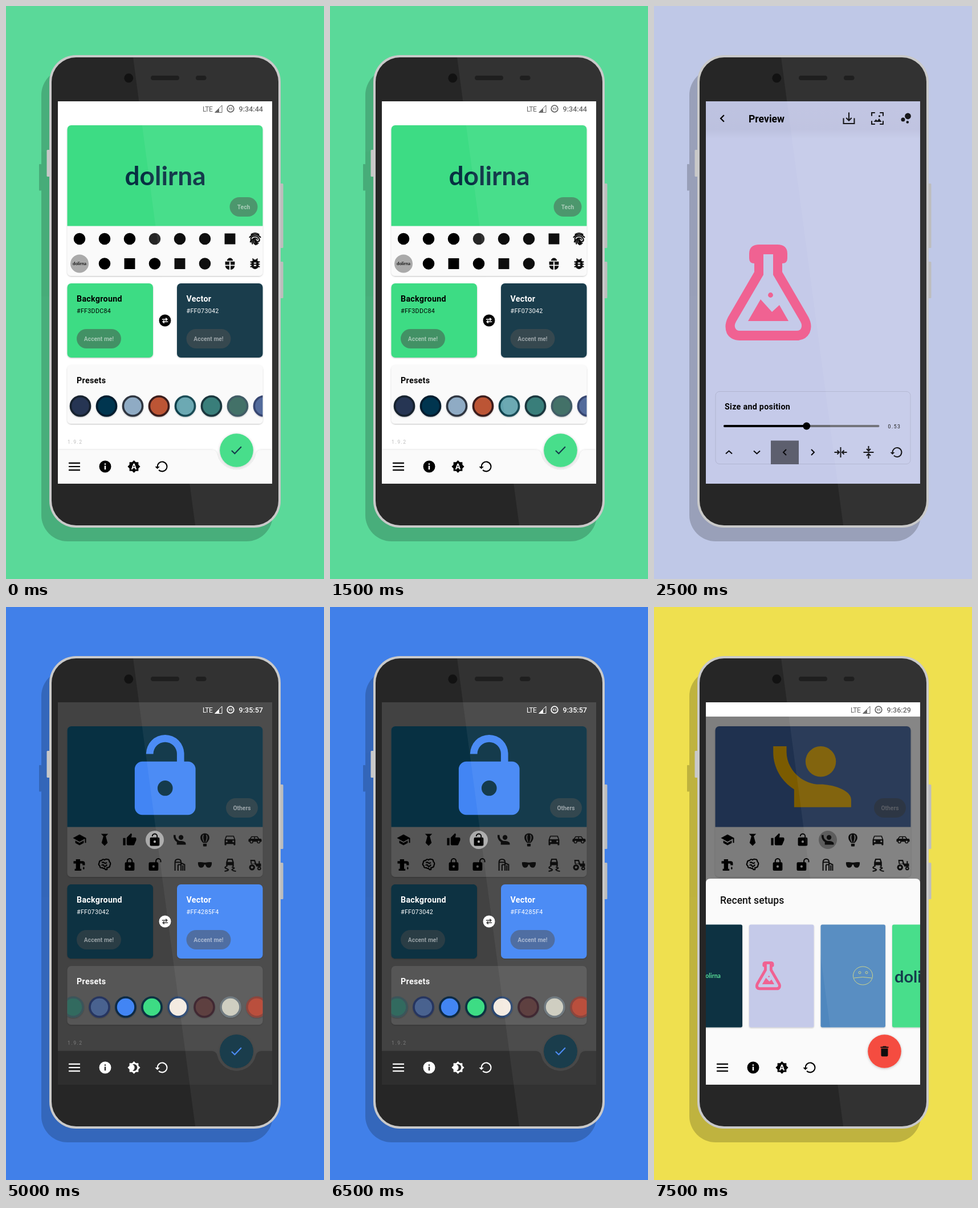
An HTML page that plays this animation: 558x1004 px, repeating every 10000 ms.

```html
<!DOCTYPE html>
<html lang="en">
<head>
<meta charset="utf-8">
<title>Wallpaper app tour</title>
<style>
html, body { margin: 0; width: 100%; height: 100%; overflow: hidden; }
svg { display: block; width: 100%; height: 100%; font-family: Roboto, sans-serif; }
.h { font-size: 14.3px; font-weight: 700; letter-spacing: .28px; }
.hex { font-size: 10.7px; letter-spacing: .3px; }
.chip { font-size: 10.3px; font-weight: 700; text-anchor: middle; }
.tiny { font-size: 8.7px; letter-spacing: 1.5px; }
.word { font-family: Lato, sans-serif; font-weight: 700; }
.line { fill: none; stroke-width: 2; }
</style>
</head>
<body>
<svg id="stage" viewBox="0 0 558 1004"></svg>
<script>
const SCENE_MS = 2500;
const WORD = 'dolirna';
const NAVY = '#073042', GREEN = '#3DDC84', BLUE = '#4285F4', LILAC = '#C5CAE9', PINK = '#F06292';

const SUN = 'M20 8.7V4h-4.7L12 .7 8.7 4H4v4.7L.7 12 4 15.3V20h4.7l3.3 3.3 3.3-3.3H20v-4.7l3.3-3.3z';

// Filled icons on a 24 unit grid
const FILL = {
  school: 'M5 13.2v4L12 21l7-3.8v-4L12 17zM12 3 1 9l11 6 9-4.9V17h2V9z',
  tie: 'M6 2l4 4-3 11 5 5 5-5-3-11 4-4z',
  thumb: 'M1 21h4V9H1zm22-11c0-1.1-.9-2-2-2h-6.300l1-4.900c0-.4-.2-.8-.5-1.100L14.200 1 7.600 7.600C7.200 8 7 8.500 7 9v10c0 1.100.9 2 2 2h9c.8 0 1.500-.5 1.800-1.200l3-7.100c.1-.2.2-.4.2-.7z',
  unlock: 'M12 17a2 2 0 1 0 0-4 2 2 0 0 0 0 4zm6-9h-1V6A5 5 0 0 0 7 6h1.900a3.100 3.100 0 0 1 6.200 0v2H6a2 2 0 0 0-2 2v10a2 2 0 0 0 2 2h12a2 2 0 0 0 2-2V10a2 2 0 0 0-2-2z',
  wave: 'M1.500 4v1.500C1.500 9.650 3.710 13.280 7 15.300V20h15v-2c0-2.660-5.330-4-8-4h-.25C9 14 5 10 5 5.500V4zM14 4a4 4 0 1 0 0 8 4 4 0 0 0 0-8z',
  balloon: 'M12 1C7 1 4.500 4.500 4.500 8.500c0 3.500 2 6 4.500 8.500h6c2.500-2.500 4.500-5 4.500-8.500C19.500 4.500 17 1 12 1zM9 18.500h6V22q0 1-1 1h-4q-1 0-1-1zM9 3.500q-3 5 1 12h1q-3-6-1-12zM15 3.500q3 5-1 12h-1q3-6 1-12z',
  car: 'M5 11l1.500-4.500h11L19 11zM17.500 16a1.500 1.500 0 1 1 0-3 1.500 1.500 0 0 1 0 3zM6.500 16a1.500 1.500 0 1 1 0-3 1.500 1.500 0 0 1 0 3zM18.900 6c-.2-.6-.8-1-1.400-1h-11c-.7 0-1.200.4-1.400 1L3 12v8a1 1 0 0 0 1 1h1a1 1 0 0 0 1-1v-1h12v1a1 1 0 0 0 1 1h1a1 1 0 0 0 1-1v-8z',
  carSide: 'M16 6l3 4h2a2 2 0 0 1 2 2v3h-2a3 3 0 0 1-6 0H9a3 3 0 0 1-6 0H1v-3a2 2 0 0 1 2-2l3-4zM10.500 7.500H6.800L4.900 10h5.600zM12 7.500V10h5.100l-1.900-2.500zM6 13.500a1.500 1.500 0 1 0 0 3 1.500 1.500 0 0 0 0-3zM18 13.500a1.500 1.500 0 1 0 0 3 1.500 1.500 0 0 0 0-3z',
  pump: 'M4 22v-3h2V10H2V6h4V3h7v3h4q4 0 4 4v3h-4v-2q0-1-1-1h-3v9h2v3zM19 15q2.500 3.500 0 5-2.500-1.500 0-5z',
  lock: 'M12 17a2 2 0 1 0 0-4 2 2 0 0 0 0 4zM18 8a2 2 0 0 1 2 2v10a2 2 0 0 1-2 2H6a2 2 0 0 1-2-2V10a2 2 0 0 1 2-2h1V6a5 5 0 0 1 10 0v2zM12 3a3 3 0 0 0-3 3v2h6V6a3 3 0 0 0-3-3z',
  lockSide: 'M18 1a5 5 0 0 0-5 5v2H4a2 2 0 0 0-2 2v10a2 2 0 0 0 2 2h12a2 2 0 0 0 2-2V10a2 2 0 0 0-2-2h-1V6a3 3 0 0 1 6 0v2h2V6a5 5 0 0 0-5-5zM10 13a2 2 0 1 1 0 4 2 2 0 0 1 0-4z',
  glasses: 'M.5 8q5-1 10 .5h3q5-1.500 10-.5v3q-1 6-5 6-4.500 0-5.500-5h-2q-1 5-5.500 5-4 0-5-6z',
  tractor: 'M4 4h8l2 6h4V6h2v4h2v5h-8a5 5 0 0 0-7-4L5 11zM6 6l.6 4H11.500L10.500 6zM7 11.500a5 5 0 1 0 0 10 5 5 0 0 0 0-10zm0 3a2 2 0 1 1 0 4 2 2 0 0 1 0-4zM19 15a3.200 3.200 0 1 0 0 6.400 3.200 3.200 0 0 0 0-6.400zm0 2a1.200 1.200 0 1 1 0 2.400 1.200 1.200 0 0 1 0-2.400z',
  bug: 'M20 8h-2.800c-.5-.8-1-1.500-1.800-2L17 4.400 15.600 3l-2.200 2.200a6 6 0 0 0-2.800 0L8.400 3 7 4.400 8.600 6C7.900 6.500 7.300 7.200 6.800 8H4v2h2.100l-.1 2H4v2h2l.1 2H4v2h2.800a6 6 0 0 0 10.400 0H20v-2h-2.100l.1-2h2v-2h-2l-.1-2H20zm-6 8h-4v-2h4zm0-4h-4v-2h4z',
  beetle: 'M7 7a5 4.500 0 0 1 10 0zM4 8.500h16V14h-7V9h-2v5H4zM4 15.500h7V22q-6-.5-7-6.500zM20 15.500h-7V22q6-.5 7-6.500z',
  info: 'M12 2a10 10 0 1 0 0 20 10 10 0 0 0 0-20zm1.200 15h-2.400v-6.500h2.400zm0-8h-2.400V6.700h2.400z',
  auto: SUN + 'M10.800 13h2.400L12 9.300zM14.600 17l-.8-2.300h-3.600L9.400 17H7.200l3.700-10.300h2.200L16.800 17z',
  night: SUN + 'M12 18q-1.300 0-2.500-.5a6 6 0 0 0 0-11Q10.700 6 12 6a6 6 0 0 1 0 12z',
  reload: 'M13 3a9 9 0 0 0-9 9H1l4 4 4-4H6a7 7 0 1 1 2.060 4.940l-1.420 1.420A9 9 0 1 0 13 3z',
  trash: 'M6 19c0 1.100.9 2 2 2h8c1.100 0 2-.9 2-2V7H6zM19 4h-3.500l-1-1h-5l-1 1H5v2h14z',
  box: 'M3 3h18v18H3z',
  dot: 'M12 1.500a10.500 10.500 0 1 0 0 21 10.500 10.500 0 0 0 0-21z',
  skid: 'M5.500 8 7.500 2h9l2 6v7h-2.500v-2H8v2H5.500zM8 7.500h8L15 4H9z'
};

// Outlined icons on the same grid
const LINE = {
  brain: 'M12 4q-3-2-5 1-4 0-4 4-2 3 1 5 0 4 4 3 2 2 4 1 1 3 4 2v-3q5 0 5-4 2-4-1-6 0-4-4-4-2-1-4 1zM7.500 9q2-2 4 0t4-1M7 13q3-2 4 1t5-2',
  silo: 'M4 22V8q0-5 5-5t5 5v14M4 8h10M9 12v10M9 12h5M14 9l6 3v10M17 13v9',
  tracks: 'M6 15q-5 2 1 4t-4 4M15 16q7 1 2 3t5 4',
  finger: 'M5 5q7-5 14 0M2.500 10Q6 5 12 5t9.500 5M4 18q2-4 1-6.500Q6 7.500 12 7.500t7.500 6q0 3-3 3t-3.500-3M8 21q-4-9 4-10.500 4 .5 4.500 3M14 22q-6-3-5-8 3-4 4 0 0 5 5 5.500M11 13.500q0 5 5 8',
  menu: 'M2.500 6.200h19M2.500 12h19M2.500 17.800h19',
  check: 'M3.800 12.500l5.200 5L20 6',
  left: 'M14.500 7l-5 5 5 5',
  right: 'M9.500 7l5 5-5 5',
  up: 'M6.500 14.500l5.500-5 5.500 5',
  down: 'M6.500 9.500l5.500 5 5.500-5',
  save: 'M3 11.500V20.500h18v-9M12 2v13M7.500 11l4.500 4.500 4.500-4.500',
  frame: 'M2.500 8V2.500H8M16 2.500h5.500V8M21.500 16v5.500H16M8 21.500H2.500V16',
  squeeze: 'M12 3v18M1 12h8M6 8.500 9.500 12 6 15.500M23 12h-8M18 8.500 14.500 12l3.500 3.500',
  swap: 'M5.500 9.500h11M13.500 6.500l3.200 3-3.200 3M18.500 14.800h-11M10.500 11.800l-3.200 3 3.200 3'
};

const GRID = {
  tech: 'dot dot dot dot dot dot box finger box dot box dot box dot beetle bug'.split(' '),
  others: 'school tie thumb unlock wave balloon car carSide pump brain lock lockSide silo glasses skid tractor'.split(' ')
};

const rect = (x, y, w, h, r, fill, more = '') =>
  `<rect x="${x}" y="${y}" width="${w}" height="${h}" rx="${r}" fill="${fill}" ${more}/>`;
const circle = (x, y, r, fill, more = '') => `<circle cx="${x}" cy="${y}" r="${r}" fill="${fill}" ${more}/>`;
const text = (x, y, s, cls, fill, more = '') => `<text x="${x}" y="${y}" class="${cls}" fill="${fill}" ${more}>${s}</text>`;
const path = (d, fill, more = '') => `<path d="${d}" fill="${fill}" fill-rule="evenodd" ${more}/>`;

function icon(name, x, y, color, k = 1.05) {
  const shape = FILL[name]
    ? path(FILL[name], color)
    : `<path class="line" d="${LINE[name]}" stroke="${color}"/>`;
  return `<g transform="translate(${x - 12 * k} ${y - 12 * k}) scale(${k})">${shape}</g>`;
}

const chip = (x, y, w, label) =>
  rect(x, y, w, 34, 17, '#484848', 'opacity=".5"') +
  text(x + w / 2, y + 20.500, label, 'chip', '#fff', 'opacity=".5"');

function status(time, color) {
  return text(345, 185, 'LTE', '', color, 'font-size="12" letter-spacing="-.5"') +
    path('M366.500 186.500 379 174V186.500z', 'none', `stroke="${color}"`) +
    path('M367 186.500l7-7v7z', color) +
    circle(394, 180, 5.800, 'none', `stroke="${color}" stroke-width="1.800"`) +
    text(394, 182, '93', '', color, 'font-size="5.500" font-weight="700" text-anchor="middle"') +
    text(408.500, 185, time, '', color, 'font-size="12.600" font-weight="500"');
}

function swatch(x, [fill, ring]) {
  return circle(x, 701, 17, fill, `stroke="${ring}" stroke-width="3.600" filter="url(#soft)"`);
}

function iconGrid(names, pick) {
  return names.map((name, i) => {
    const x = 129 + 44 * (i % 8), y = i < 8 ? 408 : 451.500;
    let out = i === pick ? circle(x, y, 16, '#aaa') : '';
    if (i === 8 && names === GRID.tech) return out + text(x, y + 2, WORD, 'word', '#111', 'font-size="7.800" text-anchor="middle"');
    if (name === 'skid') out += icon('tracks', x, y, '#000');
    const size = name === 'dot' ? .98 : 1.05;
    return out + icon(name, x, y, name === 'dot' && i === 3 ? '#262626' : '#000', size);
  }).join('');
}

function colorCard(x, title, color, ink) {
  const hex = '#FF' + color.slice(1).toUpperCase();
  return rect(x, 486, 150.500, 130, 7, color, 'filter="url(#soft)"') +
    text(x + 16.500, 518, title, 'h', ink) + text(x + 16.500, 538, hex, 'hex', ink) +
    chip(x + 16.500, 566, 78, 'Accent me!');
}

function footer(ink, mode) {
  return icon('menu', 120, 807, ink) + icon('info', 174, 807, ink) +
    icon(mode, 224.500, 807, ink, .98) + icon('reload', 273, 807, ink);
}

const fab = (color, name, ink) =>
  circle(404.500, 778.500, 29.300, color, 'filter="url(#lift)"') + icon(name, 404.500, 778.500, ink, name === 'check' ? 1.050 : 1);

function topCard(o) {
  return `<g filter="url(#soft)">${rect(107.500, 209, 343, 264, 7, o.panel)}</g><g clip-path="url(#top)">` +
    rect(107, 209, 344, 176.500, 0, o.back) + iconGrid(o.icons, o.pick) + '</g>' +
    o.art + chip(o.chipX, 335, o.chipW, o.label);
}

function home(o) {
  const ink = o.dark ? '#fff' : '#000';
  const bar = 'M91 778H360Q369 778 370.500 786A35 35 0 0 0 438.500 786Q440 778 449 778H467V837H91z';
  return rect(91, 167, 376, 670, 0, o.dark ? '#424242' : '#fff') +
    status(o.time, o.dark ? '#fff' : '#5f5f5f') + topCard(o) +
    colorCard(107.500, 'Background', o.back, ink) + colorCard(300, 'Vector', o.front, '#fff') +
    circle(279, 551, 10.500, ink) + icon('swap', 279, 551, o.dark ? '#424242' : '#fff', .8) +
    rect(107.500, 629, 343, 103, 7, o.panel, 'filter="url(#soft)"') + text(124, 661, 'Presets', 'h', ink) +
    `<g clip-path="url(#presets)">${o.swatches.map((c, i) => swatch(o.firstX + 46 * i, c)).join('')}</g>` +
    text(108, 767, '1.9.2', 'tiny', o.dark ? '#7c7c7c' : '#bdbdbd') +
    path(bar, o.dark ? '#2d2d2d' : '#fafafa', 'filter="url(#lift)"') +
    footer(ink, o.dark ? 'night' : 'auto') + fab(o.back, 'check', o.front);
}

const bigIcon = (name, color) => path(FILL[name], color, 'transform="translate(199.200 217.400) scale(6.670)"');

const flask = path('M167 434Q167 418 185 418H216Q234 418 234 434V442Q234 451 225 451V466L271 545Q279 560 273 573 266 586 250 586H151Q135 586 128 574 122 560 130 545L176 466V451Q167 451 167 442z' +
  'M192 435V471L144 553Q140 560 143 565 145 569 150 569H250Q255 569 257.500 566 261 560 257 553L209 471V435z' +
  'M165 552 187 514 207 536 220 524 236 552z', PINK) + circle(204.500, 506.500, 4.400, PINK);

function preview() {
  const tools = ['up', 'down', 'left', 'right', 'squeeze', 'squeeze', 'reload'].map((name, i) => {
    const x = 131.500 + 49 * i;
    const drawn = icon(name, x, 782, '#0b0b0e', 1);
    return i === 5 ? `<g transform="rotate(90 ${x} 782)">${drawn}</g>` : drawn;
  }).join('');
  return rect(91, 167, 376, 670, 0, LILAC) + rect(91, 167, 376, 66, 0, 'url(#bar)') +
    icon('left', 120, 197, '#000', 1.150) + text(166, 203.500, 'Preview', '', '#000', 'font-size="17.600" font-weight="700"') +
    icon('save', 342, 197, '#0b0b0e') + icon('frame', 392, 197, '#0b0b0e') +
    path('M385.500 203l4-4.500 2.500 2.500 3-4 4.500 6z', '#0b0b0e') + circle(395.500, 193, 1.700, '#0b0b0e') +
    circle(445.500, 193, 5.400, '#0b0b0e') + circle(437, 199, 3.500, '#0b0b0e') + circle(444.800, 203.500, 2.300, '#0b0b0e') +
    flask + rect(108, 675.500, 342, 127, 7, 'none', 'stroke="#b1b5d1"') +
    text(124, 707, 'Size and position', 'h', '#000') +
    rect(122, 734, 273.500, 4, 2, '#6b6c73') + rect(122, 734, 146, 4, 2, '#000') + circle(267.700, 736, 6.500, '#000') +
    text(410.500, 739.500, '0.53', 'tiny', '#111') + rect(205, 761.500, 49, 41.500, 0, '#5d5f6e') + tools;
}

function recent() {
  const tile = (x, color) => rect(x, 556.500, 113.500, 180, 3, color, 'filter="url(#soft)"');
  const pen = 'stroke="#cbd184" stroke-width="1"';
  const face = `<ellipse cx="366.500" cy="646" rx="17" ry="16" fill="none" ${pen}/>` +
    circle(361, 640.500, 2, 'none', pen) + circle(373, 640.500, 2, 'none', pen) +
    path('M351 650q15-3 31 0', 'none', pen);
  return rect(91, 167, 376, 670, 0, '#fff') +
    topCard({ panel: '#fafafa', back: '#3F639F', icons: GRID.others, pick: 4, art: bigIcon('wave', '#F8B800'), chipX: 386, chipW: 56, label: 'Others' }) +
    rect(91, 192, 376, 645, 0, '#000', 'opacity=".5"') + status('9:36:29', '#5f5f5f') +
    path('M91 837V484q0-8 8-8H459q8 0 8 8V837z', '#fafafa') +
    text(116, 520, 'Recent setups', '', '#111', 'font-size="17.600" font-weight="500"') +
    tile(41.500, NAVY) + text(117, 650, WORD, 'word', '#5ADF98', 'font-size="10.600" text-anchor="end"') +
    tile(167, LILAC) + `<g transform="translate(140.300 495.500) scale(.3)">${flask}</g>` +
    tile(292.500, '#5087BE') + face +
    tile(418, GREEN) + text(422, 658, WORD, 'word', NAVY, 'font-size="29"') +
    footer('#000', 'auto') + fab('#F44336', 'trash', '#000');
}

const pairs = list => list.split(' ').map(p => p.split('/').map(c => '#' + c));

const scenes = [
  { wall: '#5AD999', body: home({
    time: '9:34:44', back: GREEN, front: NAVY, panel: '#fafafa', icons: GRID.tech, pick: 8,
    art: text(279.500, 314, WORD, 'word', NAVY, 'font-size="46" text-anchor="middle"'),
    chipX: 392.500, chipW: 49, label: 'Tech', firstX: 130.500,
    swatches: pairs('283452/17202e 04344f/021d2d 8fabc4/2e3540 bc5434/3b1c1a 64a4af/0a414c 2d7772/0a2a31 38695e/36525c 4a6295/2a3a69')
  }) },
  { wall: '#BFC8E7', body: preview() },
  { wall: '#4180E9', body: home({
    dark: true, time: '9:35:57', back: NAVY, front: BLUE, panel: '#575757', icons: GRID.others, pick: 3,
    art: bigIcon('unlock', BLUE), chipX: 386, chipW: 56, label: 'Others', firstX: 118,
    swatches: pairs('326b5f/3a555a 4a628f/263560 4285f4/0a2a45 3ddc84/073042 f4ebe1/2b4670 543636/361d28 cccbbd/69737a b64530/863a32')
  }) },
  { wall: '#EFE04F', body: recent() }
];

const defs = `<defs>
  <filter id="soft" x="-10%" y="-10%" width="120%" height="125%"><feDropShadow dx="0" dy="1" stdDeviation="1" flood-opacity=".25"/></filter>
  <filter id="lift" x="-20%" y="-20%" width="140%" height="150%"><feDropShadow dx="0" dy="1" stdDeviation="2" flood-opacity=".28"/></filter>
  <linearGradient id="bar" x2="0" y2="1"><stop offset="0" stop-opacity=".035"/><stop offset=".75" stop-opacity=".045"/><stop offset="1" stop-opacity="0"/></linearGradient>
  <clipPath id="screen">${rect(91, 167, 376, 670, 0, '#000')}</clipPath>
  <clipPath id="top">${rect(107.500, 209, 343, 264, 7, '#000')}</clipPath>
  <clipPath id="presets">${rect(107.500, 629, 343, 103, 7, '#000')}</clipPath>
  <clipPath id="face">${rect(80, 90, 398, 820, 43, '#000')}</clipPath>
</defs>`;

const phone = `<g opacity=".2">${rect(62, 110, 406, 828, 46, '#000')}${rect(58, 277, 4, 46.500, 1, '#000')}</g>` +
  rect(71.500, 252, 6, 47, 1.500, '#c8c8c8') + rect(480, 311, 6.500, 113, 1.500, '#bdbdbd') + rect(480, 448, 6.500, 64, 1.500, '#bdbdbd') +
  rect(76, 86, 406, 828, 47, '#c9c9c9') + rect(80, 90, 398, 820, 43, '#262626') +
  circle(215.300, 126.300, 8, '#121212') + rect(254, 122, 50, 8, 4, '#121212') + rect(333, 122, 18.500, 8, 4, '#121212');

const gloss = path('M223 90H478V910H332z', '#fff', 'opacity=".055" clip-path="url(#face)"');

const stage = document.getElementById('stage');
stage.innerHTML = defs + '<rect id="wall" width="558" height="1004"/>' + phone +
  scenes.map(s => `<g class="scene" clip-path="url(#screen)">${s.body}</g>`).join('') + gloss;

const wall = document.getElementById('wall');
const layers = [...stage.querySelectorAll('.scene')];

function draw(ms) {
  const now = Math.floor(ms / SCENE_MS) % scenes.length;
  wall.setAttribute('fill', scenes[now].wall);
  layers.forEach((g, i) => g.setAttribute('display', i === now ? 'inline' : 'none'));
}

const start = performance.now();
function tick() {
  draw(performance.now() - start);
  requestAnimationFrame(tick);
}
tick();
</script>
</body>
</html>
```
